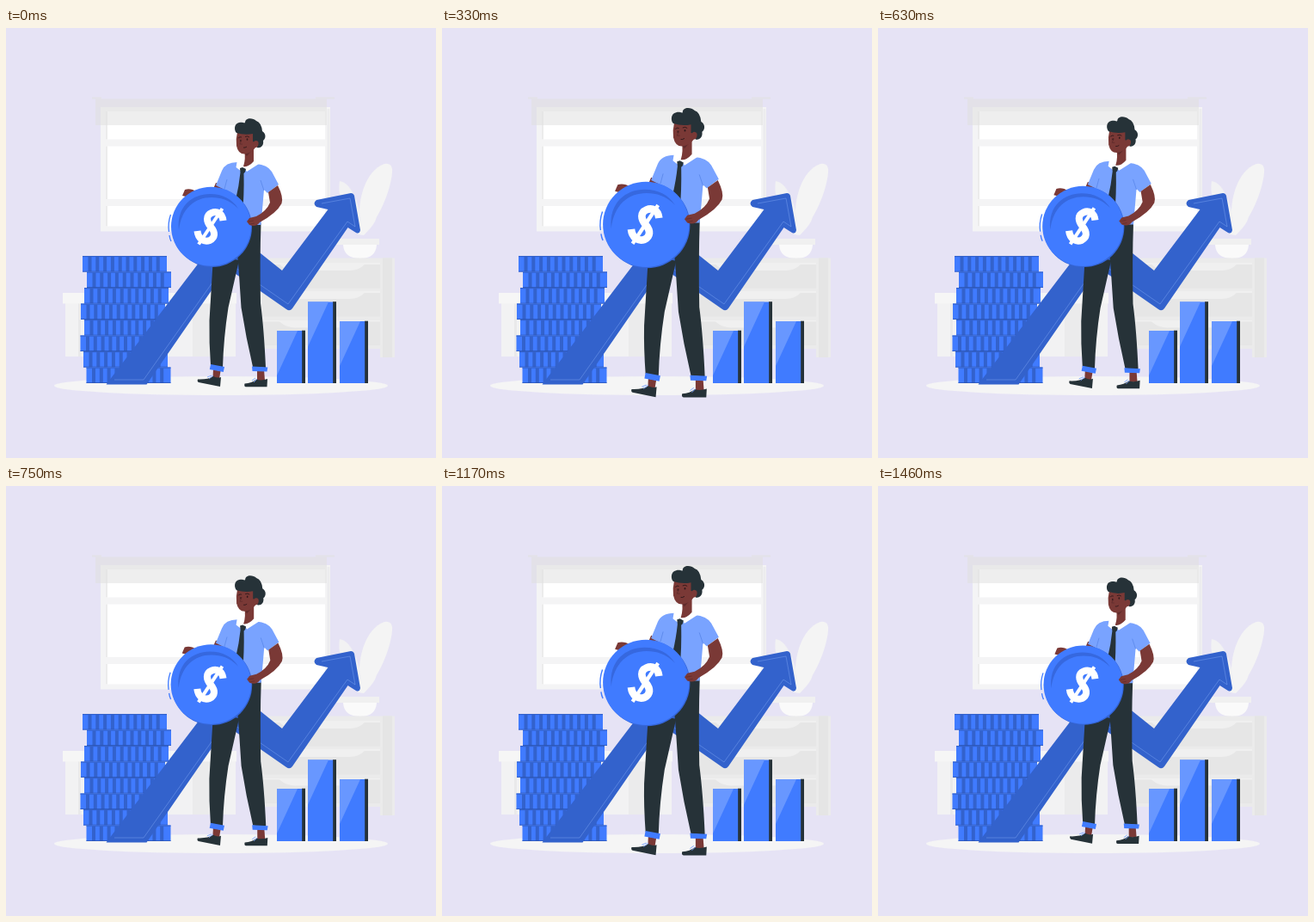
Write an HTML page with a canvas that moves like this. It is 500 by 500 pixels and loops after 1500 ms.

```html
<!DOCTYPE html>
<html lang="en">
<head>
<meta charset="utf-8">
<title>Growth</title>
<style>
html, body { margin: 0; width: 100%; height: 100%; overflow: hidden; background: #e6e3f5; }
canvas { display: block; width: 100vmin; height: 100vmin; }
</style>
</head>
<body>
<canvas id="stage" width="500" height="500"></canvas>
<script>
const canvas = document.getElementById('stage');
const BLUE = '#407bff', DEEP = '#3362cc', SHIRT = '#79a3ff', DARK = '#263238', SKIN = '#7a3936';
let ctx;

function rect(color, x, y, w, h) {
  ctx.fillStyle = color;
  ctx.fillRect(x, y, w, h);
}
function fill(color, d) {
  ctx.fillStyle = color;
  ctx.fill(new Path2D(d));
}
function stroke(color, width, d) {
  ctx.strokeStyle = color;
  ctx.lineWidth = width;
  ctx.stroke(new Path2D(d));
}
function ellipse(color, x, y, rx, ry, angle = 0) {
  ctx.fillStyle = color;
  ctx.beginPath();
  ctx.ellipse(x, y, rx, ry, angle, 0, Math.PI * 2);
  ctx.fill();
}

function drawWindow() {
  rect('#f4f4f5', 110, 92, 267, 144.5);
  rect('#ececee', 373.5, 94, 3, 140);
  for (const [y, h] of [[97, 32.5], [137.5, 61.5], [207, 23.5]]) {
    rect('#ffffff', 116, y, 255, h);
    rect('#ececec', 116, y, 2, h);
  }
  rect('rgba(225,225,225,.55)', 104, 83, 269, 30);
  rect('#e3e1e8', 104, 82.5, 269, 9.5);
  rect('#e3e2e8', 100, 80.5, 11, 2);
  rect('#e3e2e8', 360, 80.5, 22, 2);
}

function drawFurniture() {
  fill('#f4f4f4', 'M413 236C406 204 417 166 440 158Q450 156 449 168C447 191 433 222 418 237Z');
  fill('#f2f2f3', 'M412 238C393 220 385 195 388 178C402 180 412 205 415 238Z');
  fill('#f4f4f4', 'M409 240Q412 214 428 215Q437 220 416 241Z');
  rect('#f0f0f0', 384, 245, 50, 7);
  fill('#fafafa', 'M392 252H431Q430 268 412 268Q393 268 392 252Z');

  rect('#ebebeb', 294, 267.5, 158, 115.5);
  rect('#e5e5e5', 438, 267.5, 11, 115.5);
  rect('#e6e3f5', 299, 373, 136, 10);
  for (const y of [273, 306, 339.5]) {
    rect('#e6e6e6', 298, y, 137, 29.5);
    fill('#f0f0f0', `M298 ${y}H435V${y + 2}H417Q410 ${y + 9} 400 ${y + 9}H337Q326 ${y + 9} 318 ${y + 2}H298Z`);
  }

  rect('#f2f2f3', 69, 320, 198, 62);
  rect('#e9e9ea', 84, 320, 3, 62);
  rect('#ebebec', 217, 320, 22, 62);
  rect('#f6f6f6', 66, 308, 202, 12.5);
}

function drawStack() {
  const lefts = [89, 94, 91, 87, 91, 86.5, 90, 93.5];
  lefts.forEach((x, row) => {
    const y = 265 + row * 18.5;
    rect(BLUE, x, y, 98, 18.5);
    for (let i = 0; i < 10; i++) rect(DEEP, x + 6.5 + i * 8.8, y + 1, 4, 17.5);
    rect(DEEP, x, y, 98, 1.2);
    rect('#2b54b4', x, y + 17.7, 98, 0.8);
  });
}

function drawArrow() {
  fill(DEEP, 'M116.5 414.5L247 243Q252 236 260 237L296 262L321 282L374.5 211L361 208Q356 204 361 200L401 192Q404 192 405 195L412 235Q411 240 407 238L397.5 232L333 326Q330 330 326 327L257 279L163.5 414.5Z');
  stroke('rgba(150,185,255,.5)', 0.7, 'M126 409H160L257 272L328 321L397 225L406 231L400 198L367 204');
}

function drawBars() {
  for (const [x, y] of [[315, 352], [351, 318.5], [388, 341]]) {
    fill(DARK, `M${x + 29} ${y - 0.3}H${x + 33}V413H${x + 29}Z`);
    rect(BLUE, x, y, 29.2, 413 - y);
    fill('#6897ff', `M${x} ${y}H${x + 24}L${x} ${y + 52}Z`);
  }
}

function drawLegs() {
  fill(SKIN, 'M241 397L249.5 399L248 408L240.5 406Z');
  fill(SKIN, 'M292 397H300L301 410H292Z');
  fill(DARK, 'M223 408.5Q222 411 224 412L249 417L250 406Q246 407.5 241 405Q235 409 223 408.5Z');
  fill(DARK, 'M277.5 413.5Q276.5 417 279 417.3H303.5L304 408Q297 410.5 291 408.5Q286 413 277.5 413.5Z');
  stroke(SHIRT, 0.9, 'M234 406L239 404M236 408L241 404M286 410L290 407M288 412L292 408');
  fill(DARK, 'M241 265L236.5 340Q236 365 238 392L252 395Q253 360 258.5 325L271 270Z');
  fill(DARK, 'M266 240L270 272L273.5 325Q279 360 287 394L302 395Q300 350 296 320Q295 270 296.5 227H266Z');
  fill(BLUE, 'M238 391L254 394L252.8 400L236.8 397Z');
  fill(BLUE, 'M286 393.5L304.3 394.5L303.5 399.5L286.5 399Z');
}

function drawTorso() {
  fill(SKIN, 'M244 180L254 184L249 194L239 192Z');
  fill(SHIRT, 'M269 156Q255 156 251 166L244 183L254 188L252 229H296.5L300 188L304 192L317 182L309 167Q304 159 291 158Z');
  stroke('#5a88ea', 0.8, 'M254 187L257 176M300 189L296 177');
  fill('#ffffff', 'M269 153L267.5 162L274 167L277 163L280 167L294 158L288 153Z');
  fill(SKIN, 'M277 142L288 136L288 155Q282 162 276 161Q279 152 277 142Z');
  fill('#5f2b2b', 'M277 145Q283 146 287 141L280 149Z');
  fill(DARK, 'M272 163L275 162L279 164L278 167.5L276.5 169Q277 195 275 215L267 200Q271 183 272.5 168Z');
}

function drawHead() {
  fill(SKIN, 'M269 121Q267 129 268 137Q270 147 278 146.5Q286 145 290 139L295 120L285 116Z');
  fill(DARK, 'M268 122C265 119 265 111 271 110C275 109 277 111 278 110C278 104 287 104 291 108Q297 110 298 120C303 123 302 129 299 131C300 137 296 140 292 139L291 133L287 132L287 123Q278 125 268 122Z');
  ellipse(SKIN, 290.5, 135, 3, 4, 0.2);
  ellipse('#30191b', 273, 131, 0.8, 1.2);
  ellipse('#30191b', 280.5, 129.5, 0.8, 1.2);
  stroke('#30191b', 0.9, 'M270 128Q272 126 274 127M278 126.5Q281 125 283 127M276 139Q278 139.5 280 138');
  stroke('#5f2b2b', 0.8, 'M274 130L272 135L275 135');
}

function drawDollar() {
  ctx.save();
  ctx.translate(238, 231);
  stroke('#ffffff', 4, 'M13.5 -21L-14 20.5');
  stroke('#ffffff', 8, 'M14.5 -7C13.5 -16 7 -18.5 1 -16C-6 -13 -5 -6 0 0C6 7 5 13 -1 16C-8 18.5 -14.5 14 -15.5 5');
  ctx.restore();
}

function drawCoin() {
  fill(SKIN, 'M205 195L208 188Q212 186.5 217 188L221 190L214 200L209 196Z');
  ellipse('#3566d9', 239.5, 231.7, 46.5, 46.2);
  ellipse(BLUE, 238.5, 230.8, 46.5, 46);
  fill('#3668df', 'M201 235C198 207 217 193 237 193C252 193 263 199 270 210C260 200 250 197 239 197C219 197 204 210 201 235Z');
  stroke(BLUE, 1.3, 'M191.5 217Q188 227 189.5 237M190 241Q190.5 245 192 248');
  drawDollar();
}

function drawArm() {
  fill(SKIN, 'M305 191L316 183Q323 197 320.5 204Q315 215 295 226Q291 232 283 229L280 225L283 221L291 219Q303 213 307 203Z');
  stroke('#5f2b2b', 0.7, 'M282 225L288 224M284 228L289 227');
}

// Pulse size over one loop: [step, scale], 36 steps per loop
const PULSE = [[0, 1], [2, 1.009], [5, 1.034], [8, 1.078], [9, 1.09], [10, 1.078], [12, 1.044], [14, 1.019],
  [16.5, 1.003], [18, 1.006], [20, 1.011], [23, 1.034], [26, 1.077], [27, 1.09], [28, 1.078], [30, 1.044],
  [32, 1.015], [35, 0.992], [36, 1]];
const LOOP = 1500, STEPS = 36;

function pulse(step) {
  const i = PULSE.findIndex(([at]) => at > step);
  const [a, from] = PULSE[i - 1], [b, to] = PULSE[i];
  return from + (to - from) * (step - a) / (b - a);
}

function drawMan(scale) {
  ctx.save();
  ctx.translate(255, 261.5);
  ctx.scale(scale, scale);
  ctx.translate(-255, -261.5);
  for (const part of [drawLegs, drawTorso, drawHead, drawCoin, drawArm]) part();
  ctx.restore();
}

// The still scenery is painted once
const scenery = document.createElement('canvas');
scenery.width = scenery.height = 500;
ctx = scenery.getContext('2d');
rect('#e6e3f5', 0, 0, 500, 500);
ellipse('#f5f5f5', 250, 416, 194, 11);
for (const part of [drawWindow, drawFurniture, drawStack, drawArrow, drawBars]) part();
ctx = canvas.getContext('2d');

function render(now) {
  const step = Math.floor((now + 5) % LOOP / LOOP * STEPS);
  ctx.drawImage(scenery, 0, 0);
  drawMan(pulse(step));
}

const start = performance.now();
function tick(now) {
  render(Math.max(0, now - start));
  requestAnimationFrame(tick);
}
render(0);
requestAnimationFrame(tick);
</script>
</body>
</html>
```
